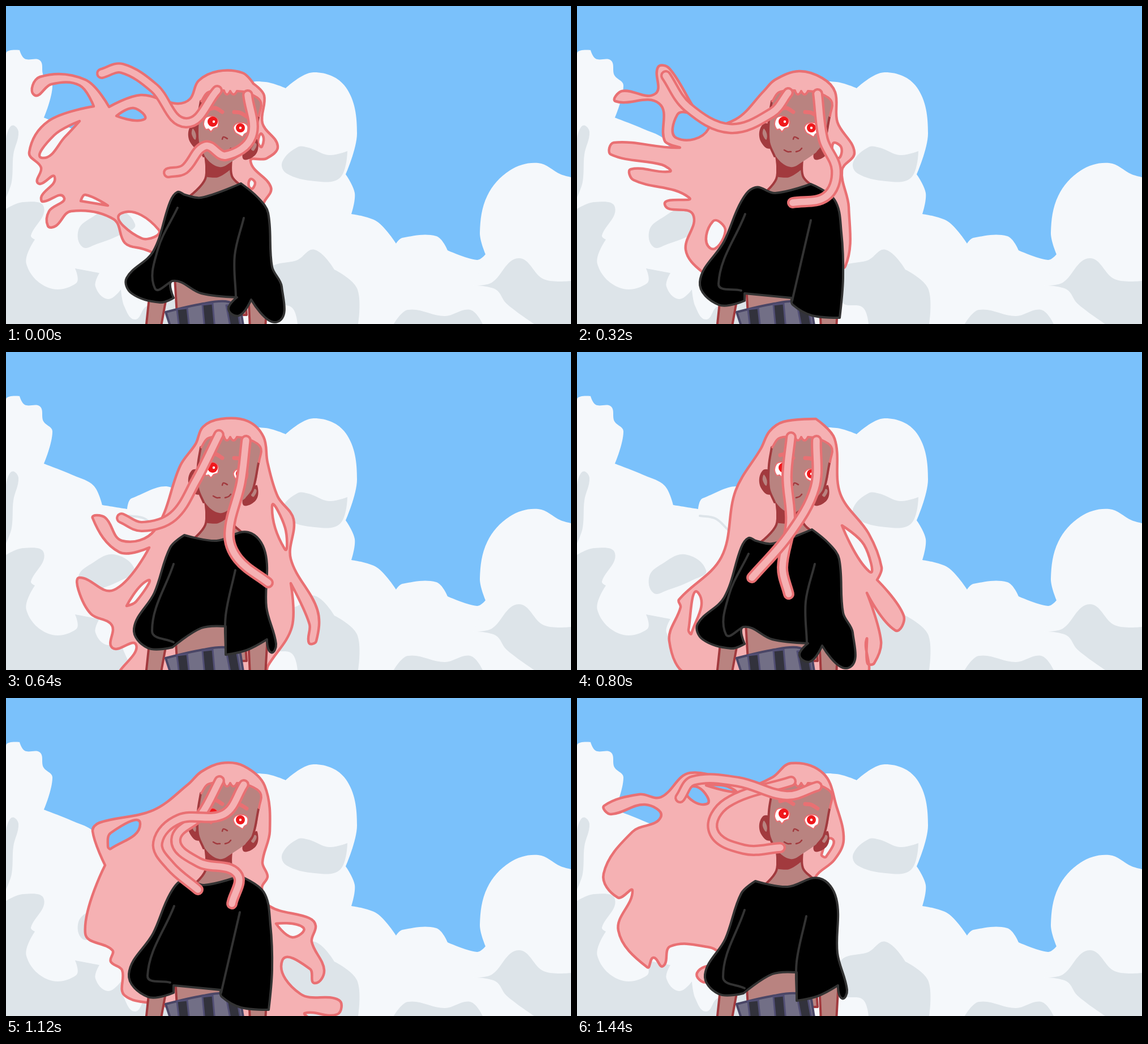
Animation of 998x561 px, one loop 1600 ms. Source, as an HTML page with a canvas:

```html
<!DOCTYPE html>
<html lang="en">
<head>
<meta charset="utf-8">
<title>Wind</title>
<style>
html, body { margin: 0; width: 100%; height: 100%; overflow: hidden; background: #7ac1fb; }
canvas { display: block; }
</style>
</head>
<body>
<canvas id="stage" width="998" height="561"></canvas>
<script>
const ctx = document.getElementById('stage').getContext('2d');
ctx.lineCap = ctx.lineJoin = 'round';

const SKY = '#7ac1fb', CLOUD = '#f5f8fb', SHADE = '#dde4e9';
const HAIR = '#f5b1b3', HAIR_EDGE = '#e97073';
const SKIN = '#b98380', SKIN_DARK = '#a23a3e', IRIS = '#f0181c';
const STEP = 160;

// Reads "x,y" points; a trailing comma marks a sharp corner.
const parse = text => text.split(' ').map(t => {
  const [x, y, corner] = t.split(',');
  return { x: +x, y: +y, k: corner === undefined ? 0.35 : 0 };
});
const parseAll = text => text.split(' | ').map(parse);

// Adds a smooth curve through the points.
function trace(pts, closed, path = new Path2D()) {
  const n = pts.length;
  const at = i => closed ? pts[(i + n) % n] : pts[Math.max(0, Math.min(n - 1, i))];
  const handle = (i, len) => {
    const a = at(i - 1), b = at(i + 1);
    const s = at(i).k * len / (Math.hypot(b.x - a.x, b.y - a.y) || 1);
    return [(b.x - a.x) * s, (b.y - a.y) * s];
  };
  path.moveTo(pts[0].x, pts[0].y);
  for (let i = 0; i < (closed ? n : n - 1); i++) {
    const p = at(i), q = at(i + 1), len = Math.hypot(q.x - p.x, q.y - p.y);
    const [ux, uy] = handle(i, len), [vx, vy] = handle(i + 1, len);
    path.bezierCurveTo(p.x + ux, p.y + uy, q.x - vx, q.y - vy, q.x, q.y);
  }
  if (closed) path.closePath();
  return path;
}

// Spreads n points evenly along a polyline.
function resample(pts, n, closed) {
  const line = closed ? [...pts, pts[0]] : pts;
  const dist = [0];
  for (let i = 1; i < line.length; i++)
    dist.push(dist[i - 1] + Math.hypot(line[i].x - line[i - 1].x, line[i].y - line[i - 1].y));
  return Array.from({ length: n }, (_, j) => {
    const d = dist.at(-1) * j / (closed ? n : n - 1);
    const i = Math.max(1, dist.findIndex(v => v >= d));
    const f = (d - dist[i - 1]) / (dist[i] - dist[i - 1]), a = line[i - 1], b = line[i];
    return { x: a.x + (b.x - a.x) * f, y: a.y + (b.y - a.y) * f };
  });
}
function between(a, b, closed) {
  const n = closed ? 64 : 9, q = resample(b, n, closed);
  return resample(a, n, closed).map((p, i) => ({ x: (p.x + q[i].x) / 2, y: (p.y + q[i].y) / 2, k: 0.33 }));
}
const blend = (a, b) => ({
  outline: between(a.outline, b.outline, true),
  gaps: [],
  lines: a.lines.map((l, i) => between(l, b.lines[i], false))
});

function paint(path, fill, edge, width = 4, rule = 'nonzero') {
  if (fill) { ctx.fillStyle = fill; ctx.fill(path, rule); }
  if (edge) { ctx.strokeStyle = edge; ctx.lineWidth = width; ctx.stroke(path); }
}
const shape = (text, fill, edge, width) => paint(trace(parse(text), true), fill, edge, width);
const line = (text, color, width) => paint(trace(parse(text), false), null, color, width);
function dot(x, y, r, color) {
  ctx.fillStyle = color;
  ctx.beginPath();
  ctx.arc(x, y, r, 0, 7);
  ctx.fill();
}

const drawing = ({ outline, gaps, lines }) => ({
  outline: parse(outline),
  gaps: gaps ? parseAll(gaps) : [],
  lines: parseAll(lines)
});

const flared = drawing({
  outline: '316,333 345,338 415,313, 445,338 463,365 470,460 487,495 480,557 433,518, 412,546 393,535 408,514, 345,507 294,485 296,515, 272,523 222,507 213,480 260,433 290,345 303,328',
  lines: '303,356 268,430 263,498 294,485 | 420,374 404,440 406,512'
});
const hanging = drawing({
  outline: '315,320 350,330 413,314, 455,342 467,400 470,480 464,550, 415,546 381,527 379,515, 296,507, 296,520, 250,527 217,487 260,415 290,345',
  lines: '297,367 250,490 290,502 | 413,378 380,520'
});
const settled = drawing({
  outline: '315,331 375,335 430,317 457,355 465,470 477,510 468,532 462,520, 395,538 378,512, 296,508, 295,518, 240,517 218,490 260,410 292,348',
  lines: '299,375 253,485 298,512 | 413,376 383,480 378,515'
});
const lifted = drawing({
  outline: '315,323, 372,333 428,318 458,354 460,450 477,515 468,530 461,507, 425,526 388,534, 388,484, 345,487 294,521, 250,522 226,488 262,425 290,345',
  lines: '296,374 258,492 296,512 | 405,385 388,465 388,530'
});
const shirts = [flared, blend(flared, hanging), hanging, settled, lifted];

const gust = drawing({
  outline: '375,115 418,118 437,137, 456,158 453,207 480,247 460,269 432,274 468,320 455,348 440,400 290,440 240,428 210,418 190,376 115,362 88,388 74,388 76,362 102,337 65,345 63,335 86,302 57,313 62,285 41,258 75,203 155,177, 130,140 80,138 50,157 60,125 140,130 182,178, 238,157 300,172 325,164 340,132',
  gaps: '195,194, 225,180 244,200 | 64,268 85,228 130,203, 105,230 | 132,344, 140,333 180,352, | 203,366 270,395 240,410 | 445,240 452,226 452,248 | 431,306 440,312 432,322',
  lines: '373,149 318,206 262,145 205,110 169,119 | 427,157 434,230 388,264 352,247 315,288 287,294'
});
const sinking = drawing({
  outline: '392,115 433,127 456,152 460,205 490,258 468,290 480,355 474,459 440,450 260,485 220,468 192,430 205,368 155,350 198,338 100,307 95,288 164,292 150,280 60,262 65,241 180,250 155,238 145,172 68,168 80,150 138,155 143,108 163,110 230,205 280,200 330,150 350,130',
  gaps: '177,192 200,190 232,217 176,233 | 240,380 262,397 235,427 | 452,243 467,250 460,268',
  lines: '373,153 345,188 270,216 195,178 157,123 | 425,155 435,235 458,290 440,336 381,347'
});
const falling = drawing({
  outline: '380,118 427,122 455,150 462,195 480,255 508,295 503,365 550,455 548,510 535,513 536,480 503,408, 505,485 463,553 455,570 205,570 230,517 188,522 187,482 150,462 128,420 130,398 190,420 253,345, 200,353 153,293 175,292 205,333 262,315 308,200 335,162 348,132',
  gaps: '213,448, 250,403 230,440 | 470,272 493,310 492,347',
  lines: '376,146 335,228 295,290 240,308 204,293 | 424,156 415,230 394,320 410,365 463,407'
});
const calm = drawing({
  outline: '365,123 422,118, 455,153 465,250 515,320 538,380 530,402, 577,465 562,491 512,425, 537,510 525,549 513,549 511,508 507,570 200,570 163,510 183,450 180,437 255,362 280,245 325,170 340,140',
  gaps: '197,490 215,426 202,497 | 468,306, 507,340 516,387',
  lines: '378,150 371,220 377,300 363,380 374,427 | 423,156 420,240 375,322 309,398'
});
const stirring = drawing({
  outline: '380,115 420,120 457,155 466,235 453,290 462,315 452,335 465,367 535,388 547,402 540,430 562,480 545,503 537,478 488,463 520,522 588,533 585,558 528,556 540,570 300,570 285,545 210,525 205,480 185,465 188,445 140,415 175,295, 153,235 165,220 260,198 322,152 345,130',
  gaps: '180,262 185,238 237,222 185,266 | 477,398, 525,405 505,422',
  lines: '377,146 345,205 300,250 340,290 408,310 399,363 | 420,153 385,205 305,214 268,255 290,296 339,338'
});
const rising = drawing({
  outline: '385,115 435,130 455,155 467,235 440,295 430,318 400,400 320,570 250,561 180,535 177,480 160,500 150,532 105,490 153,370 105,385 108,415 90,420 65,385 130,310 222,212, 188,203 130,192 103,220 76,205 92,160 145,112 220,135 285,178 340,138',
  gaps: '155,150, 190,145 217,174 180,160 | 460,402, 495,405 520,381 529,400 485,437 460,433, | 450,535 490,535 485,570',
  lines: '377,146 330,195 264,260 330,300 387,328 | 420,153 375,212 345,225 265,183 195,200'
});
const streaming = drawing({
  outline: '378,115 435,133 458,190 471,250 455,285 420,318 400,400 270,455 235,440 165,438 152,473 135,458 124,475 73,410 98,340 72,352 47,310 98,236 148,210 120,188 60,205 48,190 110,170 148,175 200,132 300,155 345,140',
  gaps: '190,165 215,158 229,187 | 228,154, 262,155 280,166 | 240,476 212,485 228,501 | 432,276 450,248 440,280',
  lines: '378,147 265,185 241,235 295,267 359,264 | 182,176 205,146 285,148 370,172 424,156'
});
const hair = [gust, blend(gust, sinking), sinking, blend(sinking, falling), falling,
  calm, blend(calm, stirring), stirring, rising, streaming];

function drawSky() {
  ctx.fillStyle = SKY;
  ctx.fillRect(0, 0, 998, 561);
  shape('0,84 24,78, 33,93 60,96 66,122 82,140 67,197, 120,218 155,236 170,270, 214,277, 222,258 300,245 350,400, 350,561, 0,561,', CLOUD);
  shape('430,140 458,134 494,145, 543,117 600,143 620,225 600,297, 616,330 610,367, 655,380 689,419, 700,409 760,406 780,431, 832,448 847,438, 847,561, 340,561,', CLOUD);
  shape('847,438, 837,400 850,335 890,290 940,277 980,297 998,302, 998,561, 800,561,', CLOUD);
  shape('0,235, 10,211 22,222 13,262 10,310 0,338,', SHADE);
  shape('0,358, 30,346 67,355 44,405 51,412, 36,455 75,497 124,489 122,463, 165,471, 158,495 180,517 203,500, 209,530 228,553 248,530 300,520 300,561, 0,561,', SHADE);
  shape('128,395 150,374 190,357 228,385 205,402 160,420 135,425', SHADE);
  shape('488,275 515,249 535,250 570,263 603,256, 590,303 545,309 495,295', SHADE);
  shape('465,465 515,448 545,430 580,465, 620,498 622,561, 515,561, 505,532 468,522', SHADE);
  shape('828,493, 858,488 905,445 950,482 998,485, 998,561, 933,561, 884,525 865,500', SHADE);
  shape('685,561, 710,536 775,547 820,536 842,561,', SHADE);
  line('217,289 245,294 268,315', SHADE, 4);
}

function drawHead() {
  shape('352,265, 352,305 325,335, 340,350, 425,345, 420,323 399,300 399,265,', SKIN, SKIN_DARK);
  shape('352,262, 352,301, 375,302 398,287, 400,262,', SKIN_DARK);
  shape('340,210 328,209 322,230 332,249 342,250', SKIN_DARK);
  shape('331,217 328,226 335,235', SKIN);
  shape('435,240 444,236 441,262 418,268', SKIN_DARK);
  shape('433,252 441,242 438,255', SKIN);

  const hairline = '345,168 357,152 385,149, 390,156 396,150, 402,156 408,150, 420,151, 449,167 447,194';
  shape(hairline + ' 436,243 395,277 377,284 355,270 339,238', SKIN);
  line('344,168 339,200 339,240 349,265', SKIN_DARK, 4);
  line('446,196 436,243 425,258', SKIN_DARK, 4);
  line(hairline, HAIR_EDGE, 4);

  line('359,182 370,180 382,187', HAIR_EDGE, 7);
  line('403,187 413,188 425,195', HAIR_EDGE, 7);
  shape('349,207 356,195 374,200 374,214, 367,216, 362,222, 358,217, 353,218,', '#fff', HAIR_EDGE, 2);
  shape('402,213 412,206 426,210 426,223, 421,226, 418,231, 411,227, 405,223', '#fff', HAIR_EDGE, 2);
  dot(365, 204, 9, IRIS);
  dot(367, 204, 2.2, '#fff');
  dot(414, 215, 8, IRIS);
  dot(414, 215, 2.2, '#fff');
  line('382,235 384,231 391,234', SKIN_DARK, 2.5);
  line('366,254 372,257 378,257', SKIN_DARK, 2.5);
  line('387,257 393,255 397,251', SKIN_DARK, 2.5);
}

function drawBody() {
  shape('298,478, 302,545, 425,545, 420,478,', SKIN, SKIN_DARK);
  shape('254,505, 247,570, 273,570, 284,510,', SKIN, SKIN_DARK);
  shape('428,505, 431,570, 458,570, 462,500,', SKIN, SKIN_DARK);
  shape('282,540, 348,525 388,521 414,532, 420,570, 292,570,', '#726f86', '#4a4666');
  for (const [x, y, lean] of [[302, 535, 4], [347, 527, 4], [389, 528, 8]])
    shape(`${x},${y}, ${x + 18},${y - 2}, ${x + 18 + lean},570, ${x + lean},570,`, '#32323c', '#514e74', 3);
}

function drawPose(i) {
  const mane = hair[i], shirt = shirts[i % shirts.length];
  drawSky();
  const path = trace(mane.outline, true);
  mane.gaps.forEach(g => trace(g, true, path));
  paint(path, HAIR, HAIR_EDGE, 4.5, mane.gaps.length ? 'evenodd' : 'nonzero');
  drawHead();
  drawBody();
  paint(trace(shirt.outline, true), '#000', '#333');
  shirt.lines.forEach(f => paint(trace(f, false), null, '#333'));
  for (const strand of mane.lines) {
    const lock = trace(strand, false);
    paint(lock, null, HAIR_EDGE, 20);
    paint(lock, null, HAIR, 11.5);
  }
}

let shown = -1;
function tick(now) {
  const pose = Math.floor(now / STEP) % hair.length;
  if (pose !== shown) drawPose(shown = pose);
  requestAnimationFrame(tick);
}
tick(performance.now());
</script>
</body>
</html>
```
